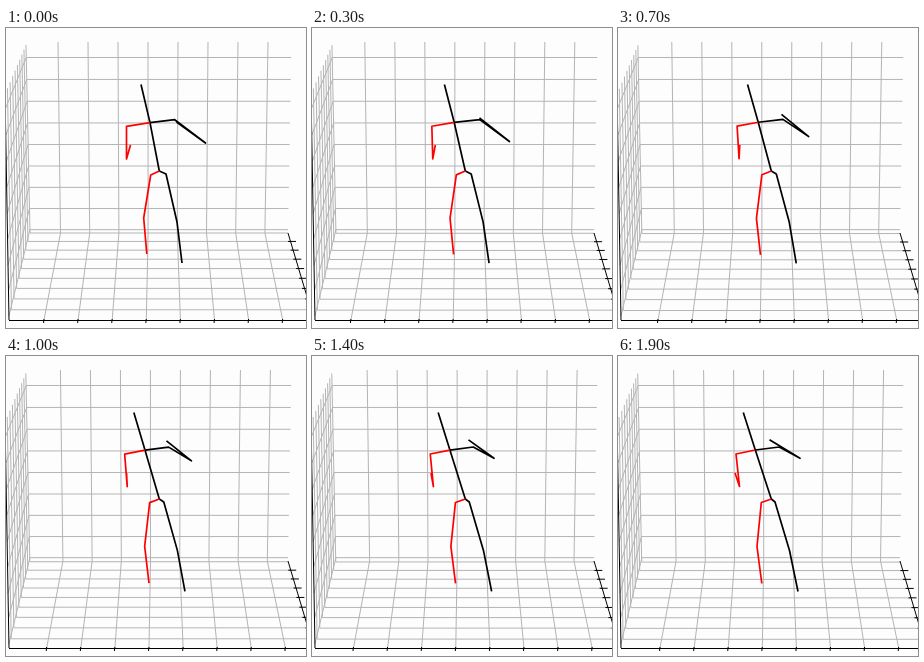
An HTML page with a canvas that plays this animation: 300 by 300 pixels, repeating every 2 s.

```html
<!DOCTYPE html>
<html>
<head>
<meta charset="utf-8">
<title>Pose in a 3D plot</title>
<style>
html, body { margin: 0; width: 100%; height: 100%; overflow: hidden; background: #fdfdfd; }
canvas { display: block; }
</style>
</head>
<body>
<canvas id="stage" width="300" height="300"></canvas>
<script>
const ctx = document.getElementById("stage").getContext("2d");
const LOOP = 2000, STEP = 100;
const PAPER = "#fdfdfd", GRID = "#b4b4b4", BLACK = "#000", RED = "#f00";

const mix = (a, b, k) => a + (b - a) * k;
const mixPoint = (p, q, k) => p.map((v, i) => mix(v, q[i], k));
const easeOut = (u, power) => 1 - (1 - u) ** power;
const smooth = u => u * u * (3 - 2 * u);

function line(color, width, ...points) {
  ctx.strokeStyle = color;
  ctx.lineWidth = width;
  ctx.beginPath();
  points.forEach(p => ctx.lineTo(...p));
  ctx.stroke();
}

// Corners of the plot box
const backTop = [20, 17], backLow = [24, 205], nearTop = [-1, 66], nearLow = [3, 292];
const rightLow = [282, 205], rightNear = [308, 292];
const NEAR_SCALE = 1.18;

// Screen share, back to front, of a floor line at an even depth
function floorShare(index, drift) {
  const depth = index / 8.9 + 0.015 * drift;
  return depth / mix(NEAR_SCALE, 1, depth);
}

const columnFoot = (i, drift) => 38 + 34.1 * i + 4 * drift;

function drawGrid(drift) {
  for (let i = 0; i < 9; i++) {
    const y = 29.5 + 22 * i - 0.06 * i * i;
    const k = (y - backTop[1]) / (backLow[1] - backTop[1]);
    line(GRID, 1, mixPoint(nearTop, nearLow, k), mixPoint(backTop, backLow, k), [mix(285.5, 282, k), y]);

    const s = floorShare(i, drift);
    line(GRID, 1, mixPoint(backTop, nearTop, s), mixPoint(backLow, nearLow, s), mixPoint(rightLow, rightNear, s));
  }
  for (let i = 0; i < 8; i++) {
    const shift = 3.6 * drift;
    line(GRID, 1, [52 + 30 * i + shift, 14], [54.5 + 29.2 * i + shift, 205], [columnFoot(i, drift), 292]);
  }
}

function drawAxes(drift) {
  line(BLACK, 1, nearTop, nearLow);
  line(BLACK, 1, [3, 292.5], [300, 292.5]);
  line(BLACK, 1, rightLow, rightNear);
  for (let i = 1; i < 9; i++) {
    const [x, y] = mixPoint(rightLow, rightNear, floorShare(i, drift));
    line(BLACK, 1, [x - 2.5, y], [x + 5.5, y]);
  }
  for (let i = 0; i < 8; i++) {
    const x = columnFoot(i, drift);
    line(BLACK, 1, [x, 291], [x - 0.5, 295]);
  }
}

function drawFigure(u) {
  const lean = easeOut(u, 1.8);
  const swing = smooth(Math.min(1, u * 1.36));
  const joint = (x0, y0, x1, y1, k = lean) => mixPoint([x0, y0], [x1, y1], k);
  const limb = (color, ...points) => line(color, 1.7, ...points);

  const pelvis = [153.3, 143], neck = joint(144, 94.6, 137.3, 94);
  const blackElbow = joint(168.7, 91.7, 161.2, 91, swing);
  const blackWrist = joint(199.5, 115, 182, 102.3, swing);
  const blackHand = [mix(170.5, 151.5, u), mix(94, 83.7, easeOut(u, 3))];

  limb(BLACK, joint(135, 56.5, 125.3, 56.5), neck, pelvis);
  limb(BLACK, neck, blackElbow, blackWrist, blackHand);
  limb(BLACK, pelvis, joint(160, 146, 157, 146), joint(171, 194, 171.5, 194.5), joint(176, 235, 180, 235.5));
  limb(RED, neck, joint(120.5, 98.3, 118, 98), joint(120.5, 131, 121.5, 130.5), joint(124.5, 117, 117, 117, u));
  limb(RED, pelvis, joint(144.7, 147, 143.3, 146.5), joint(137.7, 190, 139, 190.5), joint(140.8, 226, 143.8, 227.5));
}

function frame(now) {
  const t = Math.floor(now % LOOP / STEP) * STEP;
  const u = t / (LOOP - STEP);
  const drift = easeOut(u, 1.5);
  ctx.fillStyle = PAPER;
  ctx.fillRect(0, 0, 300, 300);
  ctx.lineJoin = "round";
  drawGrid(drift);
  drawAxes(drift);
  drawFigure(u);
}

const start = performance.now();
function tick() {
  frame(performance.now() - start);
  requestAnimationFrame(tick);
}
tick();
</script>
</body>
</html>
```
